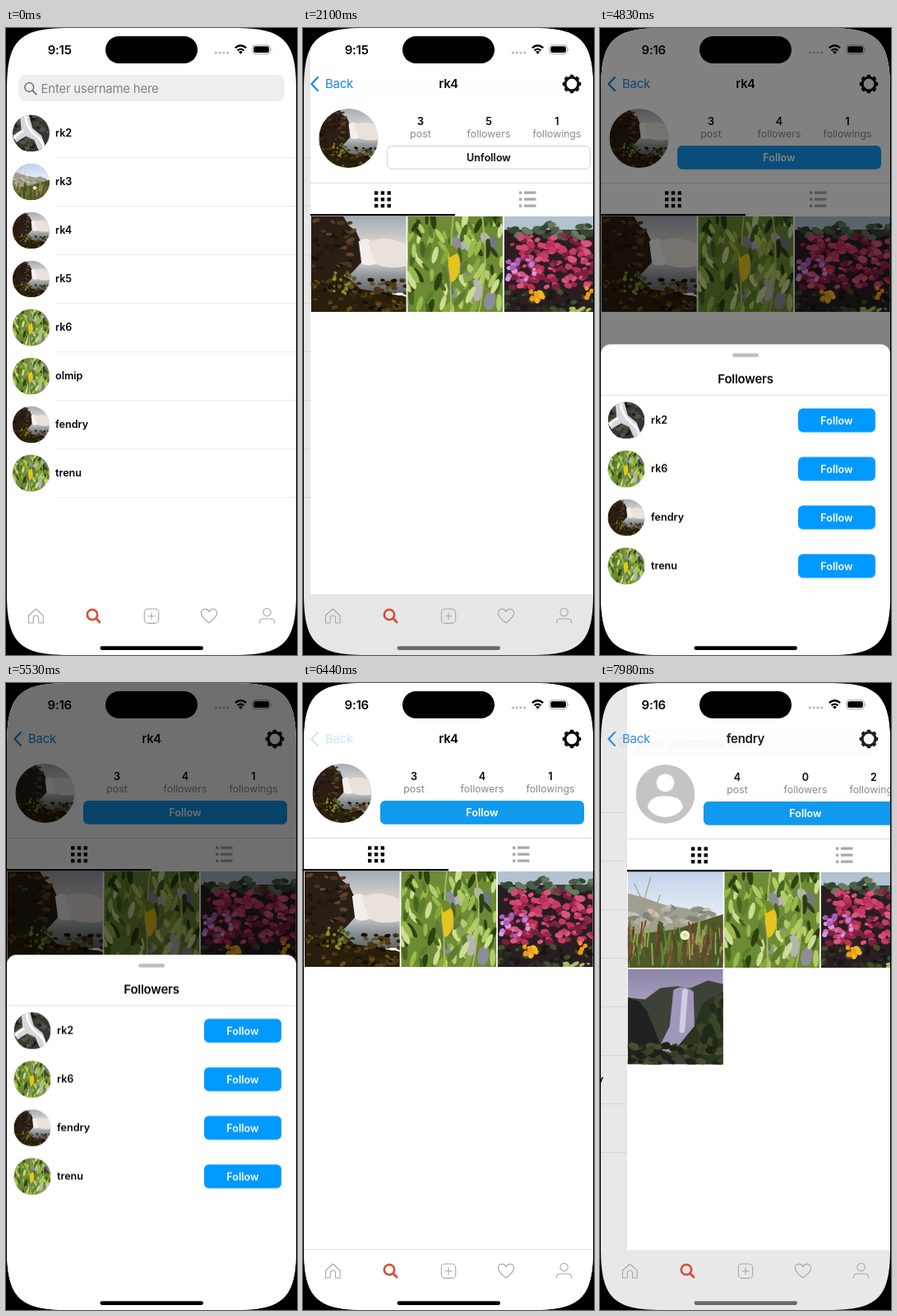
An HTML page for the animation above (8000 ms loop, 354 by 762 pixels).

```html
<!DOCTYPE html>
<html lang="en">
<head>
<meta charset="utf-8">
<title>Follow list</title>
<style>
html, body { margin: 0; width: 100%; height: 100%; overflow: hidden; background: #000; }
svg#stage { display: block; width: 354px; height: 762px; }
text { font-family: Inter, Roboto, sans-serif; fill: #050505; font-size: 12.6px; }
.b { font-weight: 600; }
.big { font-size: 15px; letter-spacing: -.25px; }
.mid { text-anchor: middle; }
.gray { fill: #8a8a8c; font-size: 12.3px; }
.white { fill: #fff; }
.line { fill: none; stroke-linecap: round; stroke-linejoin: round; }

.base, .first, .second, .bar, .sheet, .shade, .home, .press, .before, .after, .early, .late {
  animation: 8s linear infinite;
}
.base, .first, .second, .sheet, .shade {
  animation-timing-function: linear(0, .09, .264, .442, .594, .713, .801, .864, .908, .939, .96, .973, .983, .989, .993, .995, .997, .998, .999, 1, 1);
}
.base { animation-name: base; }
.first { animation-name: first; }
.second { animation-name: second; }
.bar { animation-name: bar; }
.sheet { animation-name: sheet; }
.shade { animation-name: shade; }
.home { animation-name: home; animation-timing-function: step-end; }
.press { animation-name: press; animation-timing-function: step-end; }
.before, .after { animation-name: follow; animation-timing-function: step-end; }
.early, .late { animation-name: clock; animation-timing-function: step-end; }
.before, .early { --a: 1; --z: 0; }
.after, .late { --a: 0; --z: 1; }
.list { --x1: -105.6px; }
.dim { --o0: 0; --o1: .1; }
.search { --o1: 0; }
.page { --x0: 352px; }
.nav { --o0: 0; }

/* Resting and moved states come from --x0/--o0 and --x1/--o1; the last push is cut off by the loop. */
@keyframes base {
  0%, 22.25%, 88.25% { opacity: var(--o0, 1); transform: translateX(var(--x0, 0px)); }
  29.25%, 81.25% { opacity: var(--o1, 1); transform: translateX(var(--x1, 0px)); }
  96.95% {
    opacity: var(--o0, 1); transform: translateX(var(--x0, 0px));
    animation-timing-function: linear(0, .09 11.5%, .264 23%, .442 34.4%, .594 45.9%, .713 57.4%, .801 68.9%, .864 80.3%, .908 91.8%, .933);
  }
  100% { opacity: var(--o1, 1); transform: translateX(var(--x1, 0px)); }
}
@keyframes first {
  0%, 22.25%, 88.25%, 100% { opacity: var(--o0, 1); transform: translateX(var(--x0, 0px)); }
  29.25%, 81.25% { opacity: 1; transform: translateX(0px); }
}
@keyframes second {
  0% { opacity: var(--o0, 1); transform: translateX(var(--x0, 0px)); }
  96.95% {
    opacity: var(--o0, 1); transform: translateX(var(--x0, 0px));
    animation-timing-function: linear(0, .09 11.5%, .264 23%, .442 34.4%, .594 45.9%, .713 57.4%, .801 68.9%, .864 80.3%, .908 91.8%, .933);
  }
  100% { opacity: 1; transform: translateX(0px); }
}
@keyframes bar {
  0%, 28%, 81.4%, 100% { opacity: 0; }
  29.3%, 81.2% { opacity: 1; }
}
@keyframes sheet {
  0%, 58.8%, 75.6%, 100% { transform: translateY(440px); }
  63.3%, 69.1% { transform: translateY(0px); }
}
@keyframes shade {
  0%, 58.8%, 75.6%, 100% { opacity: 0; }
  63.3%, 69.1% { opacity: .57; }
}
@keyframes home { 0%, 59.4%, 100% { fill: #000; } 22.7%, 97.1% { fill: #6a6a6a; } }
@keyframes press { 0%, 95% { opacity: 1; } 80.1% { opacity: .2; } 100% { opacity: 1; } }
@keyframes follow { 0% { opacity: var(--a); } 45.45%, 100% { opacity: var(--z); } }
@keyframes clock { 0% { opacity: var(--a); } 48.1%, 100% { opacity: var(--z); } }
</style>
</head>
<body>
<svg id="stage" viewBox="0 0 354 762"></svg>
<script>
let seed = 7;
const rand = () => (seed = (seed * 16807) % 2147483647) / 2147483647;
const rect = (x, y, w, h, fill, r = 0, extra = '') =>
  `<rect x="${x}" y="${y}" width="${w}" height="${h}" rx="${r}" fill="${fill}" ${extra}/>`;
const circle = (x, y, r, fill, extra = '') => `<circle cx="${x}" cy="${y}" r="${r}" fill="${fill}" ${extra}/>`;
const path = (d, fill, extra = '') => `<path d="${d}" fill="${fill}" ${extra}/>`;
const line = (d, color, width, extra = '') =>
  `<path class="line" d="${d}" stroke="${color}" stroke-width="${width}" ${extra}/>`;
const text = (x, y, s, cls = 'b') => `<text x="${x}" y="${y}" class="${cls}">${s}</text>`;
const group = (cls, ...parts) => `<g class="${cls}">${parts.join('')}</g>`;
const repeat = (n, f) => Array.from({ length: n }, (_, i) => f(i)).join('');

// Scattered ellipses inside a box, tilted at random.
const blobs = (n, colors, x, y, w, h, rx, ry = rx) => repeat(n, i => {
  const cx = x + rand() * w, cy = y + rand() * h, k = .6 + rand() * .7;
  return `<ellipse cx="${cx.toFixed(1)}" cy="${cy.toFixed(1)}" rx="${(rx * k).toFixed(1)}" ry="${(ry * k).toFixed(1)}"
    transform="rotate(${Math.round(rand() * 80 - 40)} ${cx.toFixed(1)} ${cy.toFixed(1)})" fill="${colors[i % colors.length]}"/>`;
});
const blades = (n, colors, y, len) => repeat(n, i => {
  const x = rand() * 100, top = y + rand() * 28;
  return line(`M${x.toFixed(1)} ${(top + len).toFixed(1)}l${(rand() * 10 - 4).toFixed(1)} ${-len}`, colors[i % colors.length], 1.6);
});
const gradient = (id, ...stops) => `<linearGradient id="${id}" x2="0" y2="1">${stops.map((c, i) =>
  `<stop offset="${i / (stops.length - 1)}" stop-color="${c}"/>`).join('')}</linearGradient>`;
const symbol = (id, ...parts) => `<symbol id="${id}" viewBox="0 0 100 100">${parts.join('')}</symbol>`;
const photo = (id, x, y, size, extra = '') => `<use href="#${id}" x="${x}" y="${y}" width="${size}" height="${size}" ${extra}/>`;
const avatar = (id, x, y, r) =>
  `<svg x="${x - r}" y="${y - r}" width="${2 * r}" height="${2 * r}" viewBox="0 0 100 100"><g clip-path="url(#round)">${photo(id, 0, 0, 100)}</g></svg>`;

const defs = `<defs>
  <clipPath id="screen">${path('M76 0H278C338 0 353 15 353 75V687C353 747 338 762 278 762H76C16 762 1 747 1 687V75C1 15 16 0 76 0Z', '#fff')}</clipPath>
  <clipPath id="round">${circle(50, 50, 50, '#fff')}</clipPath>
  ${gradient('dusk', '#a3abb6', '#dcd5cd', '#f4eee6')}${gradient('lake', '#d6d2cf', '#8d9397', '#5d6367')}
  ${gradient('day', '#c3d2ec', '#eaf0f6', '#eef0ee')}${gradient('violet', '#8d85a8', '#b3a8c6', '#7f7891')}
  ${symbol('fall', rect(0, 0, 100, 60, 'url(#dusk)'), rect(35, 46, 65, 34, 'url(#lake)'),
    path('M0 0H34L40 10L47 15L52 26L53 48L44 58L30 70L0 78Z', '#2b1e14'),
    blobs(36, ['#4a3522', '#17110c', '#5b4328', '#22180f'], 2, 4, 42, 52, 4, 2),
    path('M50 26Q58 20 66 28L70 49Q59 54 53 49Z', '#f1efec'), path('M60 27Q80 18 100 30V52Q82 56 68 50Z', '#e8e2da'),
    path('M0 60L22 58L40 65L52 76L76 80L100 84V100H0Z', '#291e0b'),
    blobs(90, ['#4a3f17', '#191006', '#5f511b', '#33260c', '#4d3318'], 0, 66, 100, 34, 3, 1.8),
    blobs(20, ['#7f8a26', '#4f5f1a', '#8f8f30'], 22, 58, 24, 24, 1.8))}
  ${symbol('leaf', rect(0, 0, 100, 100, '#6d8a34'), blobs(12, ['#8d8d98', '#b4b3ba', '#727682'], 46, 4, 54, 90, 6, 10),
    blobs(110, ['#86a83a', '#46651f', '#b2cd66', '#5d7d2b', '#2c410f', '#cfdd92', '#99b94a'], 0, 0, 100, 100, 2.6, 8),
    line('M48 0Q43 40 46 100M78 0Q86 45 75 100', '#a9bc66', 1.6),
    path('M43 33Q56 35 55 52Q54 66 46 69Q41 54 43 33Z', '#e5c51b'), path('M42 30Q49 28 53 38L44 43Z', '#6f8d24'))}
  ${symbol('bloom', rect(0, 0, 100, 100, '#2a1d22'), rect(0, 0, 100, 14, '#b3c2d0'),
    blobs(36, ['#4b5f48', '#344634', '#677a5c'], 0, 8, 100, 14, 5, 3),
    blobs(170, ['#c63b66', '#97264b', '#d9577c', '#7a1f3f', '#bd2f54', '#cf4a6d'], 8, 20, 92, 56, 3.8, 2.6),
    blobs(24, ['#c87bd0', '#a75fba', '#dc9adf'], 0, 44, 32, 24, 2.4),
    blobs(44, ['#161813', '#28331d', '#40512b'], 0, 78, 100, 22, 3.4, 2.4),
    blobs(14, ['#f09a18', '#f6b629'], 27, 79, 14, 12, 3), blobs(4, ['#f09a18'], 86, 75, 10, 10, 2.5),
    blobs(8, ['#a9c160'], 70, 95, 30, 5, 3, 1.5))}
  ${symbol('meadow', rect(0, 0, 100, 100, 'url(#day)'), path('M0 22L18 27L38 34L62 38L82 45L100 47V72H0Z', '#a09f92'),
    blobs(34, ['#b7b2a3', '#7f8674', '#c8c0b0', '#8d9380'], 2, 34, 88, 24, 6, 2.4),
    path('M0 66L50 60L100 44V100H0Z', '#4b5a28'),
    blades(100, ['#6d8035', '#7c4c36', '#3d5421', '#9aa655', '#6f3a2a'], 50, 22),
    line('M10 55L24 5M18 36L7 12M25 48L34 24', '#a69a7c', 1), circle(60, 66, 5, '#f4f2d9'), circle(60, 66, 2, '#e4d56a'))}
  ${symbol('cascade', rect(0, 0, 100, 100, '#353532'), blobs(40, ['#1a1b1b', '#55544c', '#444a37'], 0, 0, 100, 100, 8, 5),
    path('M20 0L44 0L54 36L78 56L94 100H72L58 68L36 58L10 74L0 56L24 44Z', '#d5d7d9'),
    line('M34 0Q38 38 64 57T82 98M26 44Q10 52 6 62', '#fafafa', 7))}
  ${symbol('gorge', rect(0, 0, 100, 100, 'url(#violet)'), path('M0 30L18 32L34 20L52 18L66 20L84 12L100 16V100H0Z', '#3d4239'),
    path('M48 22Q58 15 69 24L70 60L56 78L46 88L32 84L44 60Z', '#a098b8'),
    path('M0 30L12 34L20 44L30 68L38 90L0 94Z', '#1f2220'),
    line('M60 24L57 64', '#d3cce2', 6), path('M100 24L78 36L70 60L50 84L64 100H100Z', '#293320'),
    blobs(60, ['#344226', '#1a2316', '#454f2e', '#221f1a'], 0, 80, 100, 20, 5, 3),
    blobs(26, ['#3a4727', '#20291a'], 74, 34, 26, 48, 4, 6))}
  ${symbol('person', circle(50, 50, 50, '#c4c4c4'), circle(50, 31, 15, '#fff'), path('M20 73Q22 53 50 53T80 73Q69 89 50 89T20 73Z', '#fff'))}
</defs>`;

const people = [['rk2', 'cascade'], ['rk3', 'meadow'], ['rk4', 'fall'], ['rk5', 'fall'],
  ['rk6', 'leaf'], ['olmip', 'leaf'], ['fendry', 'fall'], ['trenu', 'leaf']];

const list = people.map(([name, pic], i) => {
  const y = 128 + 59 * i;
  return avatar(pic, 30.5, y, 22.5) + text(60, y + 4.3, name) + rect(60, y + 29, 396, 1, '#ececec');
}).join('');

const search = rect(15, 57, 324, 32, '#eeeef0', 9)
  + `<circle class="line" cx="28.3" cy="72" r="5.4" stroke="#6e6e72" stroke-width="1.5"/>`
  + line('M32.4 76.2L36.8 80.6', '#6e6e72', 1.8) + '<text x="42.5" y="79" class="big" style="fill:#838387">Enter username here</text>';

const gear = circle(327, 68, 8, 'none', 'stroke="#0a0a0a" stroke-width="3.2"')
  + repeat(8, i => rect(324.7, 56.7, 4.6, 4.6, '#0a0a0a', 1, `transform="rotate(${45 * i} 327 68)"`));
const nav = (name, backClass = '') => group(backClass, line('M18 60L10.4 68L18 76', '#1c84d8', 2.2),
  '<text x="27" y="73.3" class="big" style="fill:#1c84d8">Back</text>') + text(177, 73.3, name, 'b big mid') + gear;

const stat = (x, value, label) => value + text(x, 132.5, label, 'gray mid');
const num = (x, n) => text(x, 118, n, 'b mid');
const followButton = rect(94, 143, 248, 28.7, '#1199ee', 6) + text(218, 161.8, 'Follow', 'b mid white');
const unfollowButton = rect(94.5, 143.5, 247, 27.7, '#fff', 6, 'stroke="#cfcfcf"') + text(218, 161.8, 'Unfollow', 'b mid');
const tabs = rect(1, 188, 352, 1, '#dcdcdc')
  + repeat(9, i => rect(79 + i % 3 * 7.8, 198.3 + Math.floor(i / 3) * 7.8, 4.4, 4.4, '#050505'))
  + repeat(3, i => rect(255, 198.5 + i * 8, 3.4, 3.4, '#a8a8a8') + rect(261, 198.5 + i * 8, 14.5, 3.2, '#a8a8a8'))
  + rect(1, 226, 176, 2.4, '#050505');
const grid = pics => pics.map((pic, i) =>
  photo(pic, 1.8 + i % 3 * 117.5, 229 + Math.floor(i / 3) * 117.5, 116)).join('');
const page = (pic, stats, button, pics) => rect(1, 0, 352, 688, '#fff') + avatar(pic, 47.5, 134, 36)
  + stats + button + tabs + grid(pics);

const pageOne = page('fall',
  stat(135, num(135, 3), 'post')
  + stat(218, group('before', num(218, 5)) + group('after', num(218, 4)), 'followers')
  + stat(301, num(301, 1), 'followings'),
  group('before', unfollowButton) + group('after', followButton), ['fall', 'leaf', 'bloom']);
const pageTwo = page('person',
  stat(135, num(135, 4), 'post') + stat(218, num(218, 0), 'followers') + stat(301, num(301, 2), 'followings'),
  followButton, ['meadow', 'leaf', 'bloom', 'gorge']);

const gray = '#a6a6a6';
const tabBar = line('M27.5 714L36.3 706L45.2 714V723H39.5V717Q39.5 714 36.3 714T33.2 717V723H27.5Z', gray, 1.1)
  + circle(105, 713, 6.2, 'none', 'stroke="#d4513e" stroke-width="2.7"') + line('M109.8 717.8L114 722', '#d4513e', 2.9)
  + rect(168.3, 706, 17.4, 17.4, 'none', 4.5, `stroke="${gray}" stroke-width="1.1"`)
  + line('M177 710.6V718.8M172.9 714.7H181.1', gray, 1.1)
  + line('M247 723Q237.4 716 237.4 711C237.4 705.5 244.6 704.4 247 709.4C249.4 704.4 256.6 705.5 256.6 711Q256.6 716 247 723Z', gray, 1.1)
  + circle(317.6, 710, 4.7, 'none', `stroke="${gray}" stroke-width="1.1"`)
  + line('M308.6 723V721.5Q309 718 313 718H322Q326 718 326.6 721.5V723', gray, 1.1);

const status = group('early', text(65.2, 32, '9:15', 'b big mid')) + group('late', text(65.2, 32, '9:16', 'b big mid'))
  + repeat(4, i => circle(255.3 + i * 4.8, 30, 1.6, '#b9b9b9'))
  + line('M278.8 24.2Q285.5 18.3 292.2 24.2M281.6 27.3Q285.5 24 289.4 27.3', '#000', 2.2, 'style="stroke-linecap:butt"')
  + path('M283 29Q285.5 27.2 288 29L285.5 31.8Z', '#000')
  + rect(299.8, 20.8, 21.6, 10.8, 'none', 3.4, 'stroke="#a5a5a5"') + rect(301.3, 22.3, 18.6, 7.8, '#000', 2.1)
  + path('M322.6 24.4Q324.6 26.2 322.6 28Z', '#a5a5a5');

const followers = [0, 4, 6, 7].map((k, i) => {
  const y = 418 + 59 * i;
  return avatar(people[k][1], 32, y, 22.5) + text(62, y + 4.3, people[k][0])
    + rect(241, y - 14.5, 94, 29, '#0099ff', 6) + text(288, y + 4.6, 'Follow', 'b mid white');
}).join('');
const sheet = rect(1, 325.5, 352, 460, '#fff', 12) + rect(161, 336.4, 32, 4.6, '#bdbdbd', 2.3)
  + text(177, 373, 'Followers', 'b big mid') + rect(1, 387, 352, 1, '#e2e2e2') + followers;

document.getElementById('stage').innerHTML = defs + `<g clip-path="url(#screen)">`
  + rect(1, 0, 352, 762, '#fff')
  + group('base list', list)
  + group('base dim', rect(1, 0, 352, 762, '#000'))
  + group('first page', pageOne)
  + group('second page', `<g transform="translate(0 1)">${pageTwo}</g>`)
  + group('bar', rect(1, 688, 352, 74, '#fff'), rect(1, 688, 352, 1, '#e4e4e4'))
  + group('base search', search)
  + group('first nav', nav('rk4', 'press'))
  + group('second nav', nav('fendry'))
  + tabBar + status
  + group('shade', rect(1, 0, 352, 762, '#000'))
  + group('sheet', sheet)
  + rect(121, 10, 112, 33, '#000', 16.5)
  + rect(114.5, 751.3, 125.5, 4.6, '#000', 2.3, 'class="home"') + '</g>';
</script>
</body>
</html>
```
